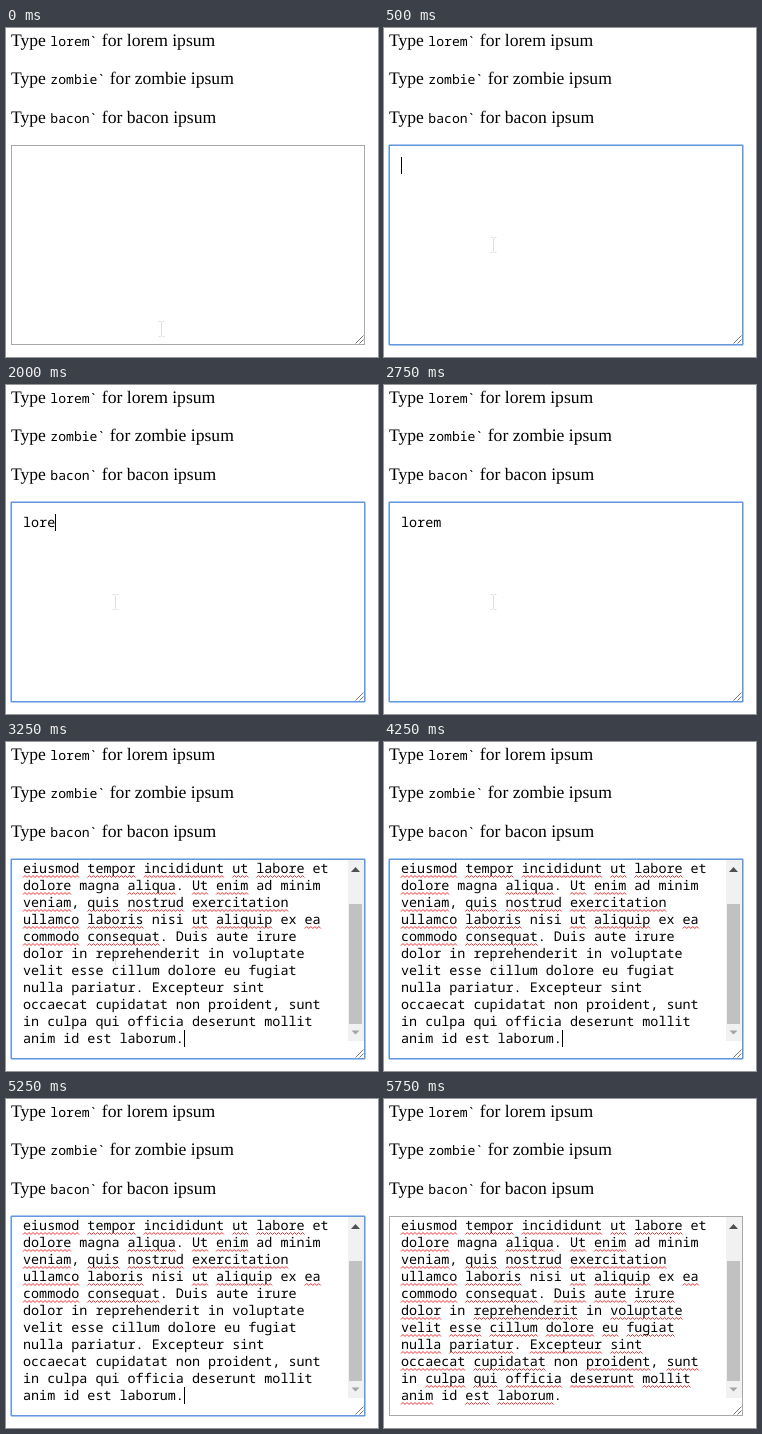
Animation, 372 px wide and 329 px high, one loop 6 s. Source, as an HTML page:

```html
<!DOCTYPE html>
<html lang="en">
<head>
<meta charset="utf-8">
<title>Ipsum expander</title>
<style>
  html, body { margin: 0; width: 100%; height: 100%; overflow: hidden; background: #fff; }
  svg { display: block; }
  text { white-space: pre; text-rendering: geometricPrecision; fill: #000; }
  .hint { font: 17.6px "Liberation Serif", serif; }
  .hint tspan { font: 13.1px "Noto Sans Mono", monospace; }
  .area { font: 13.42px "Noto Sans Mono", monospace; }
  .wave { fill: none; stroke: #ee3030; stroke-width: 1; }
</style>
</head>
<body>
<svg id="stage" width="372" height="329" viewBox="0 0 372 329">
  <defs><clipPath id="inner"><rect x="6" y="118" width="352" height="198"/></clipPath></defs>
  <g id="hints"></g>
  <rect id="glow" x="4.5" y="116.5" width="355" height="201" rx="1.5" fill="none" stroke="#a9c7f0"/>
  <rect id="frame" x="5.5" y="117.5" width="353" height="199" fill="#fff"/>
  <g id="pointer" fill="none" stroke="#dfdfdf">
    <path d="M-3 -7.5H-1L0 -6.5L1 -7.5H3M0 -6.5V6.5M-3 7.5H-1L0 6.5L1 7.5H3"/>
  </g>
  <g clip-path="url(#inner)">
    <text id="typed" class="area" x="17" y="142"></text>
    <g id="passage"></g>
  </g>
  <g id="scrollbar">
    <rect x="342" y="118" width="16" height="181" fill="#f1f1f1"/>
    <rect x="343" y="162" width="13" height="120" fill="#c1c1c1"/>
    <path d="M345 130l4.5 -5 4.5 5z" fill="#505050"/>
    <path d="M345.500 288.500l4 4 4 -4z" fill="#a3a3a3"/>
  </g>
  <path d="M349.500 315.500l8 -8M353.500 315.500l4 -4" stroke="#777" fill="none"/>
  <rect id="caret" width="1" height="17" fill="#000"/>
</svg>
<script>
const LOOP = 6000, LEFT = 17, CHAR = 8.052, LEADING = 17, FIRST = 131;
const WORD = "lorem";
const LINES = [
  "eiusmod tempor incididunt ut labore et",
  "dolore magna aliqua. Ut enim ad minim",
  "veniam, quis nostrud exercitation",
  "ullamco laboris nisi ut aliquip ex ea",
  "commodo consequat. Duis aute irure",
  "dolor in reprehenderit in voluptate",
  "velit esse cillum dolore eu fugiat",
  "nulla pariatur. Excepteur sint",
  "occaecat cupidatat non proident, sunt",
  "in culpa qui officia deserunt mollit",
  "anim id est laborum."
];
const KNOWN = new Set(["ad", "et", "ex", "id", "in", "magna", "minim", "nisi", "non"]);
const $ = id => document.getElementById(id);

function add(parent, tag, attrs, text = "") {
  const el = document.createElementNS("http://www.w3.org/2000/svg", tag);
  for (const name in attrs) el.setAttribute(name, attrs[name]);
  el.textContent = text;
  return parent.appendChild(el);
}

function show(el, on) {
  el.setAttribute("visibility", on ? "visible" : "hidden");
}

function wave(start, length, baseline) {
  const x = LEFT + start * CHAR;
  return `M${x.toFixed(1)} ${baseline + 4.5}` + "l2 -2 2 2".repeat(Math.round(length * CHAR / 4));
}

["lorem", "zombie", "bacon"].forEach((name, i) => {
  const line = add($("hints"), "text", { class: "hint", x: 5, y: [18, 56, 95][i] }, "Type ");
  add(line, "tspan", {}, name + "`");
  line.append(` for ${name} ipsum`);
});

// Words up to "consequat" are flagged at once, the rest only on blur.
let early = "", late = "", pastFirst = false;
LINES.forEach((line, row) => {
  const y = FIRST + row * LEADING;
  for (const { 0: word, index } of line.matchAll(/\w+/g)) {
    if (word === "Duis") pastFirst = true;
    if (KNOWN.has(word)) continue;
    const d = wave(index, word.length, y);
    if (pastFirst) late += d; else early += d;
  }
});
add($("passage"), "path", { class: "wave", d: early });
const lateMarks = add($("passage"), "path", { class: "wave", d: late });
LINES.forEach((line, row) =>
  add($("passage"), "text", { class: "area", x: LEFT, y: FIRST + row * LEADING }, line));

function pointerAt(t) {
  if (t < 250) return [155.5, 301];
  if (t >= 500 && t < 4750) return [109.5, 217];
  return null;
}

function caretOn(t) {
  if (t < 1250) return t < 1000;
  if (t < 3250) return t < 2750;
  return Math.floor((t - 3250) / 500) % 2 === 0;
}

function render(t) {
  const focused = t >= 500 && t < 5750;
  const expanded = t >= 3250;
  const count = Math.max(0, Math.min(WORD.length, Math.floor((t - 1000) / 250)));

  $("frame").setAttribute("stroke", focused ? "#6399dc" : "#a9a9a9");
  show($("glow"), focused);
  $("typed").textContent = expanded ? "" : WORD.slice(0, count);
  show($("passage"), expanded);
  show($("scrollbar"), expanded);
  show(lateMarks, expanded && !focused);

  const column = expanded ? LINES[LINES.length - 1].length : count;
  $("caret").setAttribute("x", Math.round(LEFT + column * CHAR));
  $("caret").setAttribute("y", expanded ? 288 : 129);
  show($("caret"), focused && caretOn(t));

  const point = pointerAt(t);
  show($("pointer"), point);
  if (point) $("pointer").setAttribute("transform", `translate(${point})`);
}

const begin = performance.now();
function tick() {
  render((performance.now() - begin) % LOOP);
  requestAnimationFrame(tick);
}
tick();
</script>
</body>
</html>
```
